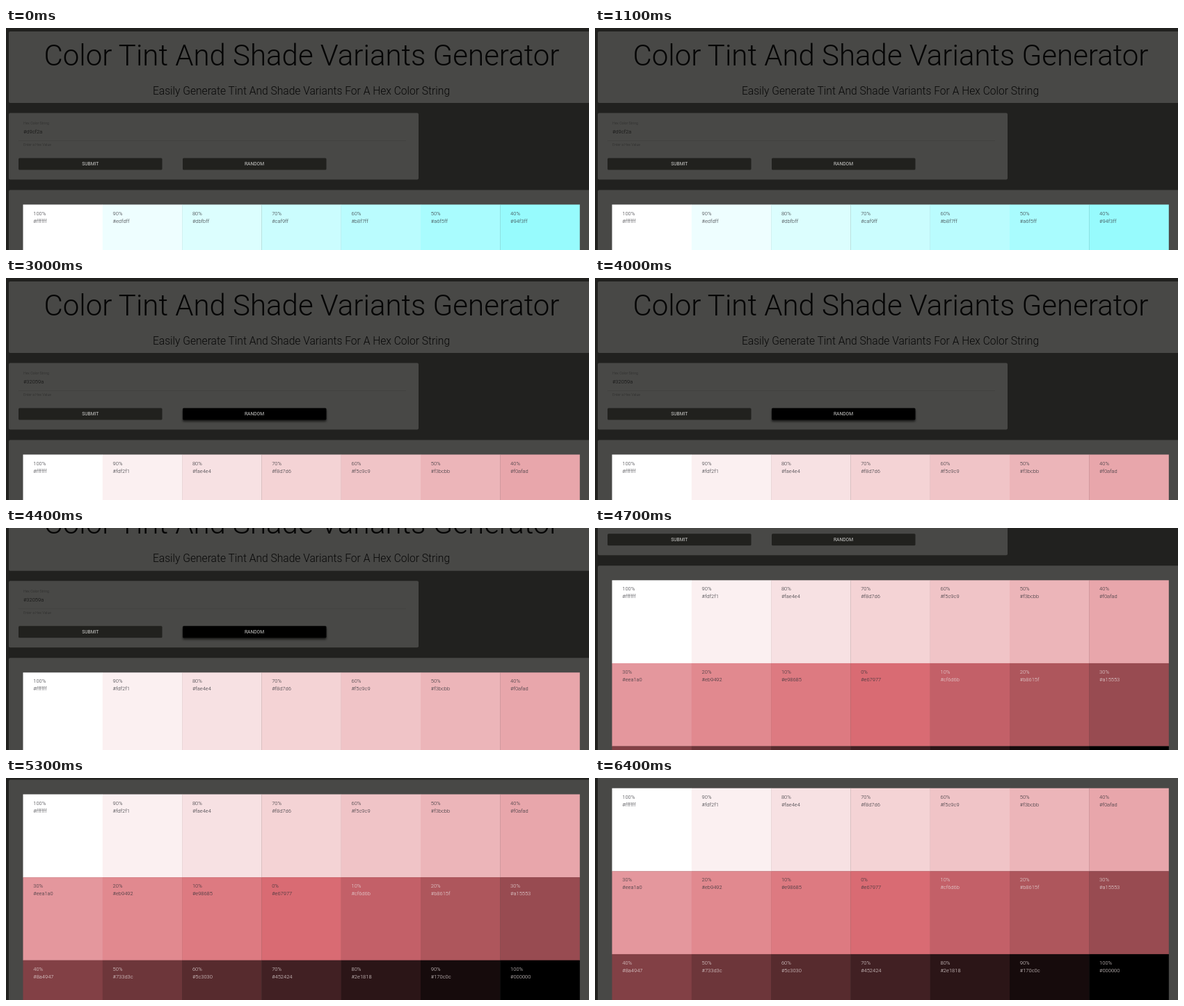
Animation, 838 px wide and 320 px high, one loop 6800 ms. Source, as an HTML page:

```html
<!DOCTYPE html>
<html lang="en">
<head>
<meta charset="utf-8">
<title>Color Tint And Shade Variants Generator</title>
<style>
  html, body { margin: 0; width: 100%; height: 100%; overflow: hidden; background: #21211f; }
  svg { display: block; width: 838px; height: 320px; }
  text { font-family: Roboto, sans-serif; font-weight: 300; white-space: pre; }
  .mid { text-anchor: middle; }
  .btn { font-size: 6.7px; font-weight: 400; fill: #cfcfcd; }
  .tag { font-size: 7.5px; }
  .hint { font-size: 5.2px; fill: #2b2b2a; }
</style>
</head>
<body>
<svg id="stage" viewBox="0 0 838 320" xmlns="http://www.w3.org/2000/svg">
  <defs>
    <filter id="blur" x="-10%" y="-60%" width="120%" height="220%">
      <feGaussianBlur stdDeviation="1.6"/>
    </filter>
  </defs>
  <rect width="838" height="320" fill="#21211f"/>
  <g id="page"></g>
</svg>
<script>
const LOOP = 6800, STEP = 100;
const COLS = 7, CELL_W = 114.3, CELL_H = 119.6, LEFT = 24.5, TOP = 254.5;
const PANEL = '#484846', DARK = '#21211e';

const page = document.getElementById('page');

function add(tag, attrs, text) {
  const el = document.createElementNS('http://www.w3.org/2000/svg', tag);
  for (const k in attrs) el.setAttribute(k, attrs[k]);
  if (text !== undefined) el.textContent = text;
  page.appendChild(el);
  return el;
}
const box = (x, y, width, height, fill, rx = 0) => add('rect', { x, y, width, height, fill, rx });
const label = (x, y, text, attrs) => add('text', { x, y, ...attrs }, text);

// header
box(4, 5, 842, 103, PANEL, 2);
label(425, 54, 'Color Tint And Shade Variants Generator', { class: 'mid', 'font-size': 42, fill: '#050505' });
label(424.5, 95.5, 'Easily Generate Tint And Shade Variants For A Hex Color String',
  { class: 'mid', 'font-size': 15.6, fill: '#080808' });

// form
box(4, 122.5, 589, 96, PANEL, 2);
label(25, 139.3, 'Hex Color String', { class: 'hint' });
const field = label(25, 152.4, '', { class: 'tag', fill: '#0c0c0c' });
box(18, 162, 557, 0.6, '#3f3f3d');
label(25, 170, 'Enter a Hex Value', { class: 'hint' });
box(18, 187.5, 206.5, 17, DARK, 1.5);
const glow = box(254, 190, 206.5, 17, '#000', 1.5);
glow.setAttribute('filter', 'url(#blur)');
const random = box(254, 187.5, 206.5, 17, DARK, 1.5);
label(121.2, 198.3, 'SUBMIT', { class: 'btn mid' });
label(357, 198.3, 'RANDOM', { class: 'btn mid' });

// swatches: 100% tint down to the base colour, then up to 100% shade
box(4, 233.5, 842, 420, PANEL, 2);
const cells = Array.from({ length: 21 }, (_, i) => {
  const x = LEFT + (i % COLS) * CELL_W, y = TOP + Math.floor(i / COLS) * CELL_H;
  const pct = Math.abs(10 - i) * 10, shade = i > 10;
  const rect = add('rect', { x, y, width: CELL_W + 0.2, height: CELL_H + 0.2 });
  const fill = shade ? '#e8dede' : '#303036';
  label(x + 14.8, y + 15.1, pct + '%', { class: 'tag', fill });
  const code = label(x + 14.8, y + 26, '', { class: 'tag', fill });
  return { rect, code, pct, end: shade ? 0 : 255 };
});

function mix(base, pct, end) {
  return '#' + base.map(c => Math.round((end * pct + c * (100 - pct)) / 100)
    .toString(16).padStart(2, '0')).join('');
}

const palettes = {
  cyan: { name: [77, 235, 255], fill: [82, 248, 252] },
  red: { name: [230, 121, 119], fill: [217, 107, 115] }
};
let current;
function paint(id) {
  if (id === current) return;
  current = id;
  const p = palettes[id];
  for (const c of cells) {
    c.rect.setAttribute('fill', mix(p.fill, c.pct, c.end));
    c.code.textContent = mix(p.name, c.pct, c.end);
  }
}

const ramp = (t, a, b) => Math.min(1, Math.max(0, (t - a) / (b - a)));

// scroll position in px, with smooth tangents between the keys
const keys = [[4200, 0], [4300, 11], [4400, 46.2], [4500, 100], [4600, 147], [4700, 179.2],
  [4800, 194], [4900, 201.2], [5100, 217], [5300, 231], [5600, 239.8]];
function scroll(t) {
  const n = keys.length - 1;
  if (t <= keys[0][0]) return 0;
  if (t >= keys[n][0]) return keys[n][1];
  const i = keys.findIndex(k => k[0] > t) - 1;
  const [t0, y0] = keys[i], [t1, y1] = keys[i + 1], d = t1 - t0;
  const slope = j => j < 1 || j >= n ? 0
    : (keys[j + 1][1] - keys[j - 1][1]) / (keys[j + 1][0] - keys[j - 1][0]);
  const u = (t - t0) / d, v = 1 - u;
  return y0 * v * v * (1 + 2 * u) + y1 * u * u * (3 - 2 * u)
    + d * u * v * (slope(i) * v - slope(i + 1) * u);
}

function render(ms) {
  const t = Math.floor((ms % LOOP) / STEP) * STEP;
  page.setAttribute('transform', `translate(0 ${-scroll(t)})`);

  const hover = ramp(t, 1300, 1600) * (1 - ramp(t, 4400, 4700));
  random.setAttribute('fill', mix([33, 33, 30], hover * 100, 0));
  glow.setAttribute('opacity', hover * 0.6);

  field.textContent = t < 1800 ? '#d9cf2a' : t < 2800 ? '#89a39f' : '#32059a';
  paint(t < 2800 ? 'cyan' : 'red');
}

const start = performance.now();
function tick() {
  render(performance.now() - start);
  requestAnimationFrame(tick);
}
tick();
</script>
</body>
</html>
```
